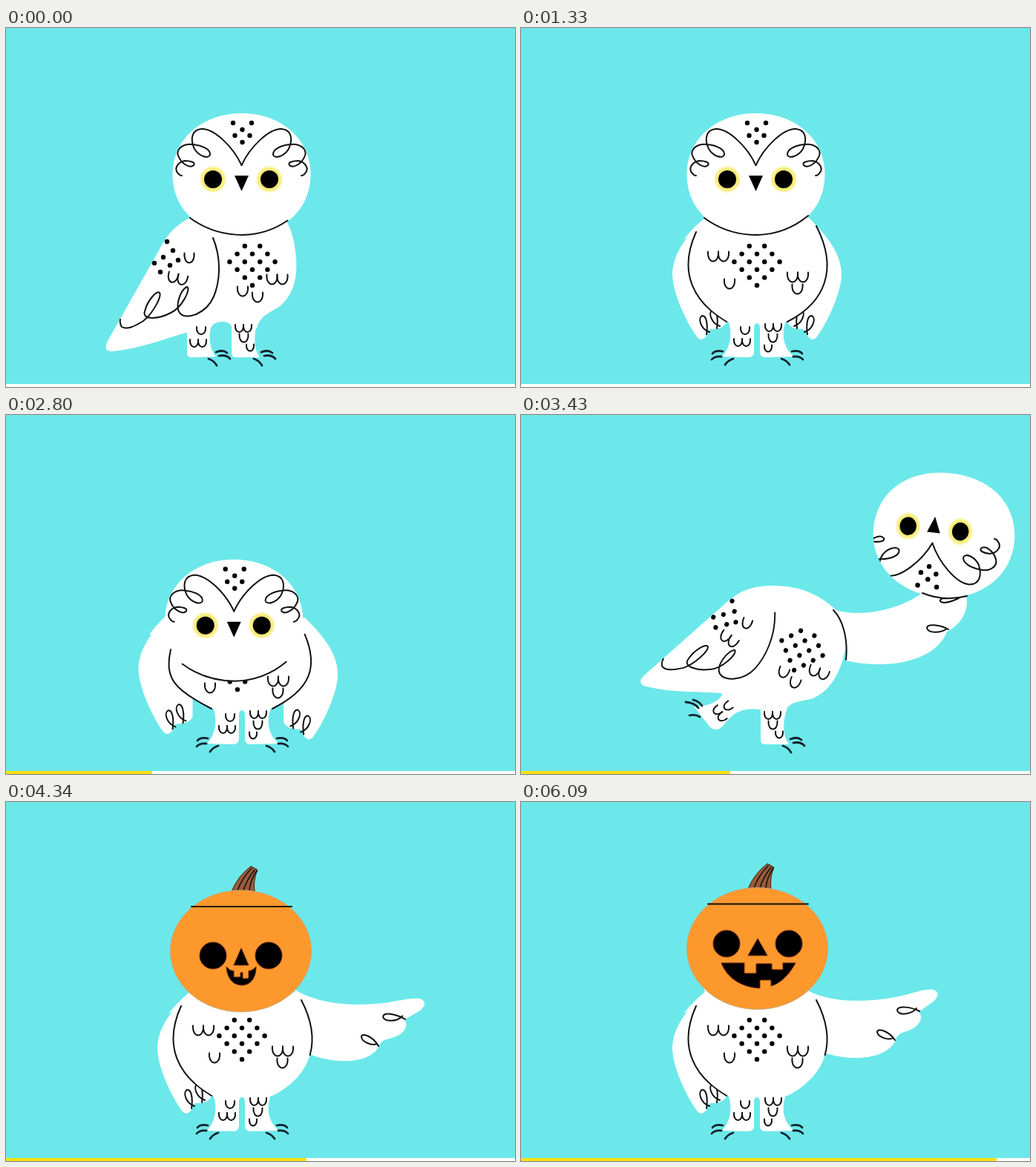
Recreate the animation shown at these times as an HTML page. Size 686 by 484 pixels, loop 6.16 s.

```html
<!DOCTYPE html>
<html lang="en">
<head>
<meta charset="utf-8">
<title>Snowy owl</title>
<style>
  html, body { margin: 0; width: 100%; height: 100%; overflow: hidden; background: #6ce8ea; }
  svg { display: block; width: 686px; height: 484px; }
  .white { fill: #fff; }
  .ink { fill: none; stroke: #111; stroke-width: 2; stroke-linecap: round; stroke-linejoin: round; }
  .toe { fill: none; stroke: #14222c; stroke-width: 2.8; stroke-linecap: round; }
</style>
</head>
<body>
<svg viewBox="0 0 686 484">
  <defs>
    <radialGradient id="glow">
      <stop offset=".76" stop-color="#f7ec78"/>
      <stop offset="1" stop-color="#f7ec78" stop-opacity="0"/>
    </radialGradient>
    <path id="skull" d="M316.5 115C370 115 409.5 150 409.5 197C409.5 246 372 279 316.5 279C261 279 223.5 246 223.5 197C223.5 150 263 115 316.5 115Z"/>
    <clipPath id="skullClip"><use href="#skull"/></clipPath>
    <path id="brow" class="ink" d="M316.5 185C305 160 280 136 263 136C249 137 247 150 253 163C259 173 272 177 274 171C275 163 262 158 251 157C238 155 228 163 231 172C235 183 247 190 252 185C255 181 247 179 240 179C230 181 225 190 231 196Q233 199 236 199"/>
    <g id="wing">
      <path class="white" d="M248 256C222 282 204 305 204 333C205 358 222 395 237 416Q243 424 250 415Q251 405 259 406Q272 406 277 397V300L290 256Z"/>
      <g class="ink">
        <path id="curl" d="M250 413C252 400 250 387 244 388C238 391 242 406 254 410"/>
        <use href="#curl" x="14" y="-8"/>
      </g>
    </g>
    <g id="frontToes" class="toe">
      <path d="M272 436Q262 434 258 439M270 443Q261 442 257 447M286 446Q279 448 275 454"/>
    </g>
    <g id="sideToes" class="toe">
      <path d="M283 437Q292 433 298 438M287 442Q297 440 302 446M273 446Q280 448 284 455"/>
    </g>
    <g id="diamond"></g>
  </defs>

  <g id="side">
    <g id="sideBody">
      <path class="white" d="M248 256C224 268 216 282 206 300L137 422Q130 436 143 436C180 433 215 418 246 410L275 408C277 398 285 396 292 396Q303 396 305 405L338 405C342 388 355 384 368 376C388 360 393 335 391 310C389 285 384 272 379 262Q316 224 248 256Z"/>
      <path class="ink" d="M279 283C292 315 287 345 280 362C270 385 245 393 236 386C226 378 235 352 244 349C250 352 236 378 222 384C205 393 183 394 187 382C191 366 204 353 207 357C210 362 198 385 185 395C172 403 163 407 156 403Q153 399 154 393"/>
      <use href="#diamond" x="14"/>
      <g id="sideMarks"></g>
    </g>
    <g id="sideLeg">
      <path class="white" d="M304 392V438Q304 444 310 444H342C335 434 332 418 340 394Z"/>
      <g id="sideLegMarks"></g>
      <use href="#sideToes" x="61"/>
    </g>
    <g id="legDown">
      <path class="white" d="M244 404V438Q244 444 250 444L283 443C277 436 272 422 276 404Z"/>
      <g id="legDownMarks"></g>
      <use href="#sideToes"/>
    </g>
    <g id="legUp">
      <path class="white" d="M250 364L272 371C274 382 255 394 233 393L255 421Q263 428 271 420C285 404 294 392 328 398L330 368Z"/>
      <g id="legUpMarks" transform="translate(271 398) rotate(55)"></g>
      <path class="toe" d="M222 387Q234 388 239 395M232 384Q240 386 244 392M227 405Q235 403 241 407"/>
    </g>
  </g>

  <g id="front">
    <use id="wingL" href="#wing"/>
    <g id="wingR"><use href="#wing" transform="matrix(-1 0 0 1 636 0)"/></g>
    <g id="pointer">
      <path class="white" d="M386 254C420 272 470 270 510 262C530 257 545 252 555 253C566 256 562 266 550 273L536 283C543 290 538 303 520 309Q507 312 505 320C500 335 480 345 450 345C430 345 415 340 408 338L385 310Z"/>
      <path class="ink" d="M537 282C525 276 507 274 507 281C509 288 526 287 533 278M504 321C496 309 481 304 480 310C481 317 495 322 502 318"/>
    </g>
    <path id="torso" class="white"/>
    <path class="white" d="M277 390C285 405 285 428 271 443L306 444Q314 444 314 436V405Q314 398 318 398Q322 398 322 405V436Q322 444 330 444L368 443C352 430 350 410 359 390Z"/>
    <path id="lineL" class="ink"/>
    <path id="lineR" class="ink" pathLength="100"/>
    <g id="chest"><use href="#diamond"/><g id="chestMarks"></g></g>
    <g id="frontLegMarks"></g>
    <use href="#frontToes"/>
    <use href="#frontToes" transform="matrix(-1 0 0 1 637 0)"/>
  </g>

  <g id="head">
    <use href="#skull" class="white"/>
    <g clip-path="url(#skullClip)">
      <g id="face">
        <use href="#brow"/>
        <use href="#brow" transform="matrix(-1 0 0 1 633 0)"/>
        <g id="crown"></g>
        <g id="eyes">
          <circle cx="278" cy="204" r="19" fill="url(#glow)"/>
          <circle cx="354" cy="204" r="19" fill="url(#glow)"/>
          <circle cx="278" cy="204" r="12"/>
          <circle cx="354" cy="204" r="12"/>
          <path d="M307 199H326L316.5 220Z"/>
        </g>
      </g>
    </g>
    <path id="collar" class="ink" pathLength="100" d="M247 256Q278 279 318 279Q357 278 387 253"/>
  </g>

  <g id="neck">
    <path class="white" d="M421 262C450 272 500 268 541 240Q570 250 600 244C605 265 590 285 574 292C560 330 500 345 437 331Q441 285 421 262Z"/>
    <path class="ink" d="M421 263C433 275 441 300 438 330M541 240Q570 252 601 244M590 247C583 250 578 253 570 253C562 252 564 247 572 247M576 289C568 284 548 280 547 287C549 295 566 294 574 288"/>
  </g>

  <g id="pumpkin">
    <path d="M306 117Q314 97 332 83L341 88Q335 102 337 117Z" fill="#9a5a38" stroke="#3a241a"/>
    <path class="ink" style="stroke-width:1.5" d="M314 116Q320 99 333 86M322 116Q326 102 337 88M330 116Q331 102 340 89"/>
    <ellipse cx="318.5" cy="197.5" rx="95" ry="82" fill="#fd982d" stroke="#c9a67a"/>
    <path class="ink" d="M252 137.5H387"/>
    <g id="grin" stroke="#6d2410">
      <circle cx="277" cy="191" r="18"/>
      <circle cx="361" cy="191" r="18"/>
      <path d="M319 184L306 207H332Z"/>
      <path d="M270 217H301V231H317V218H338V226H353V217H370C360 236 346 246 337 248V240H322V251C298 250 278 238 270 217Z"/>
    </g>
    <g id="smile" stroke="#6d2410" transform="translate(2 -3.5)">
      <circle cx="279" cy="207" r="18"/>
      <circle cx="354" cy="207" r="18"/>
      <path d="M317 197L307 220H327Z"/>
      <path d="M297 222Q302 228 307 228V236H316V230H319V238H327V228Q333 227 337 222C337 238 329 247 318 247C306 247 298 238 297 222Z"/>
    </g>
  </g>

  <rect y="480" width="686" height="4" fill="#fff"/>
  <rect id="bar" y="480" height="4" fill="#fbe112"/>
</svg>
<script>
const LOOP = 6160, STEP = 70;
const $ = id => document.getElementById(id);
const put = (id, markup) => { $(id).innerHTML = markup; };
const move = (id, value) => $(id).setAttribute('transform', value);
const show = (id, on) => { $(id).style.display = on ? '' : 'none'; };
const squeeze = (sx, x, y) => `translate(${x} ${y}) scale(${sx} 1) translate(${-x} ${-y})`;

const dot = (x, y) => `<circle cx="${x}" cy="${y}" r="3.2"/>`;
const dots = list => list.map(p => dot(...p)).join('');
// One feather scallop centred on x, y; "pair" sets two side by side.
const cup = (x, y, w = 14, h = 13) =>
  `<path class="ink" d="M${x - w / 2} ${y - h / 2}c${-w * .1} ${h * 1.33} ${w * 1.1} ${h * 1.33} ${w} 0"/>`;
const pair = (x, y, w = 14, h = 13) => cup(x - w / 2, y, w, h) + cup(x + w / 2, y, w, h);

const rows = [2, 3, 4, 3, 2, 1];
put('diamond', rows.map((n, r) => Array.from({ length: n }, (_, i) =>
  dot(318 + (i - (n - 1) / 2) * 20.4, 294 + r * 10.6)).join('')).join(''));
put('crown', dots([[305, 128], [330, 128], [317.5, 137], [307.5, 145], [327.5, 145], [317.5, 154]]));
put('chestMarks', pair(266, 308) + cup(281, 345) + pair(373, 336) + cup(372.5, 352));
put('frontLegMarks', cup(302, 408, 12, 10) + pair(298, 424, 11, 10) +
  pair(340, 404, 11, 10) + cup(339.5, 418, 12, 11) + cup(333, 432, 10, 9));
put('sideMarks',
  dots([[217, 288], [225, 300], [212, 309], [232, 313], [200, 317], [221, 320], [208, 329]]) +
  cup(247, 310, 13) + `<g transform="rotate(14 231 338)">${pair(231, 338, 13)}</g>` +
  pair(365.5, 339) + cup(319, 355) + cup(339, 363));
put('sideLegMarks', pair(320, 405, 11, 10) + cup(320.5, 418, 12, 11) + cup(329, 431, 10, 9));
put('legDownMarks', cup(263, 408, 12, 10) + pair(259, 425, 11, 10));
put('legUpMarks', cup(0, -9, 11, 10) + pair(2, 6, 11, 10));

function track(keys, t) {
  if (t <= keys[0][0]) return keys[0][1];
  for (let i = 1; i < keys.length; i++) {
    const [a, va] = keys[i - 1], [b, vb] = keys[i];
    if (t <= b) return va + (vb - va) * (t - a) / (b - a);
  }
  return keys[keys.length - 1][1];
}

const SWAY = [[1400, 0], [1610, 22], [2030, 100], [2800, 187], [3080, 360]];
const REACH = [[3150, 0], [3220, .2], [3360, .85], [3430, 1], [3570, 1.05], [3850, 1.05], [4060, 0]];

function poseFront(dx, dy, pumpkin) {
  move('wingL', `translate(${-.32 * dy} ${.13 * dy})`);
  move('wingR', `translate(${.25 * dx + .22 * dy} ${.22 * dy})`);
  move('chest', `translate(${.48 * dx - .02 * dy} ${.29 * dy})`);
  const ax = .25 * dx - .147 * dy, ay = .49 * dy - .24 * dx;
  const bx = .19 * dx + .08 * dy, by = .36 * dy;
  const left = `${236 + ax} ${275 + ay}C${211 + ax + .4 * ay} ${330 + .6 * ay} ${233 + ax / 2} 370 277 396`;
  const rightEnd = `${398 + bx} ${267 + by}`;
  const c1 = `${428 + bx - .4 * by} ${325 + .5 * by}`, c2 = `${410 + bx / 4} 370`;
  const shoulder = `L${248 + .2 * dx} 256Q${234 - .12 * dy} ${267 - .15 * dy} ${219 - .32 * dy} ${285 + .13 * dy}`;
  $('lineL').setAttribute('d', 'M' + left);
  $('lineR').setAttribute('d', `M${rightEnd}C${c1} ${c2} 359 396`);
  $('lineR').style.strokeDasharray = pumpkin ? '50 200' : 'none';
  $('torso').setAttribute('d', `M${left}H359C${c2} ${c1} ${rightEnd}L${388 + .2 * dx} 256` +
    `L${316 + dx} ${197 + dy}L${226 + dx} ${191 + dy}${shoulder}Z`);
}

function draw(t) {
  const pumpkin = t >= 4060;
  const side = t < 1190 || (t >= 3150 && !pumpkin);
  const angle = track(SWAY, t) * Math.PI / 180;
  const k = track(REACH, t);
  const lean = side ? Math.min(k, 1) : 0;
  show('side', side);
  show('front', !side);
  show('head', !pumpkin);
  show('pumpkin', pumpkin);
  show('pointer', pumpkin);
  show('wingR', !pumpkin);
  show('neck', side && k > .1);

  if (side) {
    const bob = t < 700 ? 3 * Math.sin(Math.PI * t / 700) : 0;
    move('sideBody', `translate(${19 * lean} 0) rotate(${20 * lean} 349 394) ` +
      squeeze(1 - .04 * lean, 332, 347));
    move('sideLeg', `translate(${19 * lean} 0)`);
    show('legDown', lean < .5);
    show('legUp', lean >= .5);
    move('neck', squeeze(k, 421, 0));
    move('head', `translate(${317.5 + 252.5 * k} ${197 - 35 * k + bob}) rotate(${186 * lean}) ` +
      `scale(${1 + .025 * lean}) translate(-316.5 -197)`);
  } else {
    const dx = 76 * Math.sin(angle), dy = 40 - 40 * Math.cos(angle);
    poseFront(dx, dy, pumpkin);
    move('head', `translate(${dx} ${dy})`);
  }
  move('face', `translate(${14 * lean} 0)`);
  move('eyes', squeeze(1 - .09 * lean, 316.5, 204));
  show('collar', !side || k === 0);
  $('collar').style.strokeDasharray = side ? '93 200' : 'none';

  if (pumpkin) {
    const lift = (1 - Math.cos(2 * Math.PI * (t - 4340) / 700)) / 2;
    const drop = 1 - lift;
    move('pumpkin', `translate(${-2 * drop} ${3.5 * drop})`);
    move('pointer', `rotate(${4.5 * drop} 400 300)`);
    show('grin', lift > .5);
    show('smile', lift <= .5);
  }
  $('bar').setAttribute('width', Math.max(0, (t - 1341) * .135));
}

const start = performance.now();
function frame() {
  const t = (performance.now() - start) % LOOP;
  draw(Math.floor(t / STEP) * STEP);
  requestAnimationFrame(frame);
}
frame();
</script>
</body>
</html>
```
